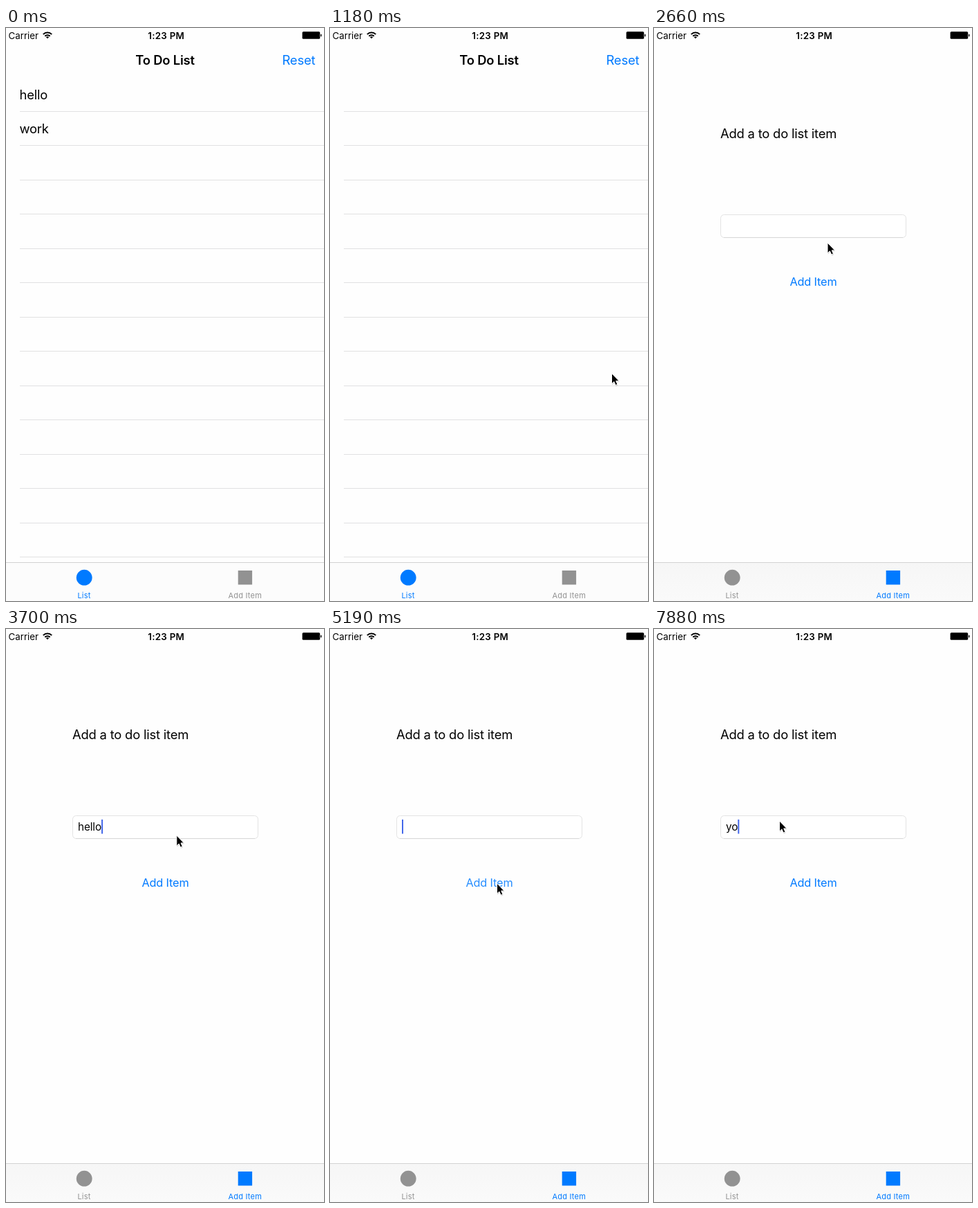
These frames come from a looping animation (460 by 827 pixels, 8000 ms). An HTML page:

```html
<!DOCTYPE html>
<html lang="en">
<head>
<meta charset="utf-8">
<title>To do list</title>
<style>
  html, body { margin: 0; height: 100%; overflow: hidden; background: #fefefe; }
  svg { display: block; width: 100vw; height: 100vh; }
  text { font: 18.4px Inter, Roboto, sans-serif; letter-spacing: -.2px; white-space: pre; }
  .mid { text-anchor: middle; }
  .bold { font-weight: 600; }
  .blue { fill: #007aff; }
  .status { font-size: 13.3px; letter-spacing: 0; }
  .clock { letter-spacing: .3px; }
  .button { font-size: 16.3px; letter-spacing: -.15px; }
  .input { font-size: 15.3px; letter-spacing: -.1px; }
  .tab { fill: #929292; }
  .tab.on { fill: #007aff; }
  .tab text { font-size: 11px; letter-spacing: .2px; }
</style>
</head>
<body>
<svg viewBox="0 0 460 827">
  <defs>
    <linearGradient id="shade" x2="0" y2="1">
      <stop stop-color="#f6f6f6"/><stop offset="1" stop-color="#fafafa"/>
    </linearGradient>
  </defs>
  <rect width="460" height="827" fill="#fefefe"/>

  <text class="status" x="3.5" y="15.5">Carrier</text>
  <g fill="none" stroke="#000" stroke-width="2">
    <path d="M53.8 9.1A8.7 8.7 0 0 1 66.2 9.1M56.3 11.7A5.2 5.2 0 0 1 63.7 11.7"/>
    <path d="M60 15.3L57.9 13.2A3 3 0 0 1 62.1 13.2Z" fill="#000" stroke="none"/>
  </g>
  <text class="status clock bold mid" x="231.7" y="15.5">1:23 PM</text>
  <rect x="428.6" y="5.2" width="25.6" height="10.6" rx="1.6"/>
  <rect x="455" y="8.8" width="1.4" height="3.6" rx=".7"/>

  <g id="list">
    <text class="bold mid" x="230" y="53">To Do List</text>
    <text class="blue" id="reset" x="399.5" y="53">Reset</text>
    <g id="rules" fill="#e1e1e2"></g>
    <g id="items">
      <text x="19.5" y="102.5">hello</text>
      <text x="19.5" y="152">work</text>
    </g>
  </g>

  <g id="form">
    <text x="96" y="159">Add a to do list item</text>
    <rect x="96.5" y="269.5" width="268" height="33" rx="5" fill="#fff" stroke="#e3e3e3"/>
    <path d="M101 302.5H360" stroke="#d6d6d6"/>
    <text class="input" id="input" x="104" y="291"></text>
    <rect id="caret" y="275" width="2" height="20.5" fill="#4468ea"/>
    <text class="button blue mid" id="add" x="230.5" y="372">Add Item</text>
  </g>

  <rect id="bar" y="771" width="460" height="56"/>
  <rect y="771" width="460" height="1" fill="#d2d2d2"/>
  <g class="tab" id="listTab">
    <circle cx="113.2" cy="793.2" r="11.4"/>
    <text class="mid" x="113" y="823">List</text>
  </g>
  <g class="tab" id="formTab">
    <rect x="335.7" y="783" width="20.4" height="20.4"/>
    <text class="mid" x="345.8" y="823">Add Item</text>
  </g>

  <g id="cursor">
    <path d="M0 0V15L3.4 11.9 5.6 17 8.4 15.8 6.2 10.9H10.6Z" transform="translate(.6 1.4)" opacity=".18"/>
    <path d="M0 0V15L3.4 11.9 5.6 17 8.4 15.8 6.2 10.9H10.6Z" stroke="#fff"/>
  </g>
</svg>
<script>
const LOOP = 8000;
const el = id => document.getElementById(id);
const show = (id, on) => el(id).style.display = on ? '' : 'none';

const start = { at: null, items: true, form: false, shaded: false, caret: false, text: '', reset: 1, add: 1 };

// Each step: start time, then what changes; "at" is the pointer tip.
const steps = [
  [150, { at: [449, 70] }],
  [300, { at: [424, 47] }],
  [450, { reset: .2 }],
  [600, { items: false }],
  [750, { reset: .7 }],
  [900, { at: [421, 110], reset: 1 }],
  [1050, { at: [411, 330] }],
  [1180, { at: [407.5, 498.5] }],
  [1330, { at: [378, 640] }],
  [1480, { at: [344, 785] }],
  [1630, { at: [340.5, 805.5], form: true }],
  [2070, { at: [338, 760], shaded: true }],
  [2220, { at: [310, 600] }],
  [2370, { at: [275, 420] }],
  [2520, { at: [251, 310] }],
  [2670, { at: [246.8, 298] }],
  [2810, { caret: true }],
  ...[3110, 3260, 3410, 3550, 3700].map((t, i) => [t, { text: 'hello'.slice(0, i + 1) }]),
  [4300, { at: [246, 310] }],
  [4450, { at: [243, 340] }],
  [4600, { at: [241.5, 362] }],
  [4750, { at: [241.5, 367] }],
  [4900, { add: .2 }],
  [5040, { text: '', add: .4 }],
  [5190, { add: .85 }],
  [5340, { add: 1 }],
  [5490, { at: [239, 355] }],
  [5640, { at: [228, 322], caret: false }],
  [5790, { at: [212, 301] }],
  [6840, { at: [190.5, 281] }],
  [6990, { at: [184, 278], caret: true }],
  [7140, { at: [181.5, 277] }],
  [7580, { text: 'y' }],
  [7880, { text: 'yo' }],
];

for (let i = 0; i < 14; i++) {
  const y = Math.floor(120 + 49.5 * i);
  el('rules').innerHTML += `<rect x="20" y="${y}" width="440" height="1"/>`;
}

function draw(now) {
  const t = now % LOOP;
  const s = Object.assign({}, start, ...steps.filter(([from]) => from <= t).map(step => step[1]));
  show('list', !s.form);
  show('form', s.form);
  show('items', s.items);
  show('caret', s.caret);
  show('cursor', s.at);
  el('reset').style.opacity = s.reset;
  el('add').style.opacity = s.add;
  el('listTab').classList.toggle('on', !s.form);
  el('formTab').classList.toggle('on', s.form);
  el('bar').setAttribute('fill', s.shaded ? 'url(#shade)' : '#fcfcfc');
  el('input').textContent = s.text;
  el('caret').setAttribute('x', 104 + (s.text ? el('input').getComputedTextLength() : 0));
  if (s.at) el('cursor').setAttribute('transform', `translate(${s.at})`);
  requestAnimationFrame(draw);
}
requestAnimationFrame(draw);
</script>
</body>
</html>
```
